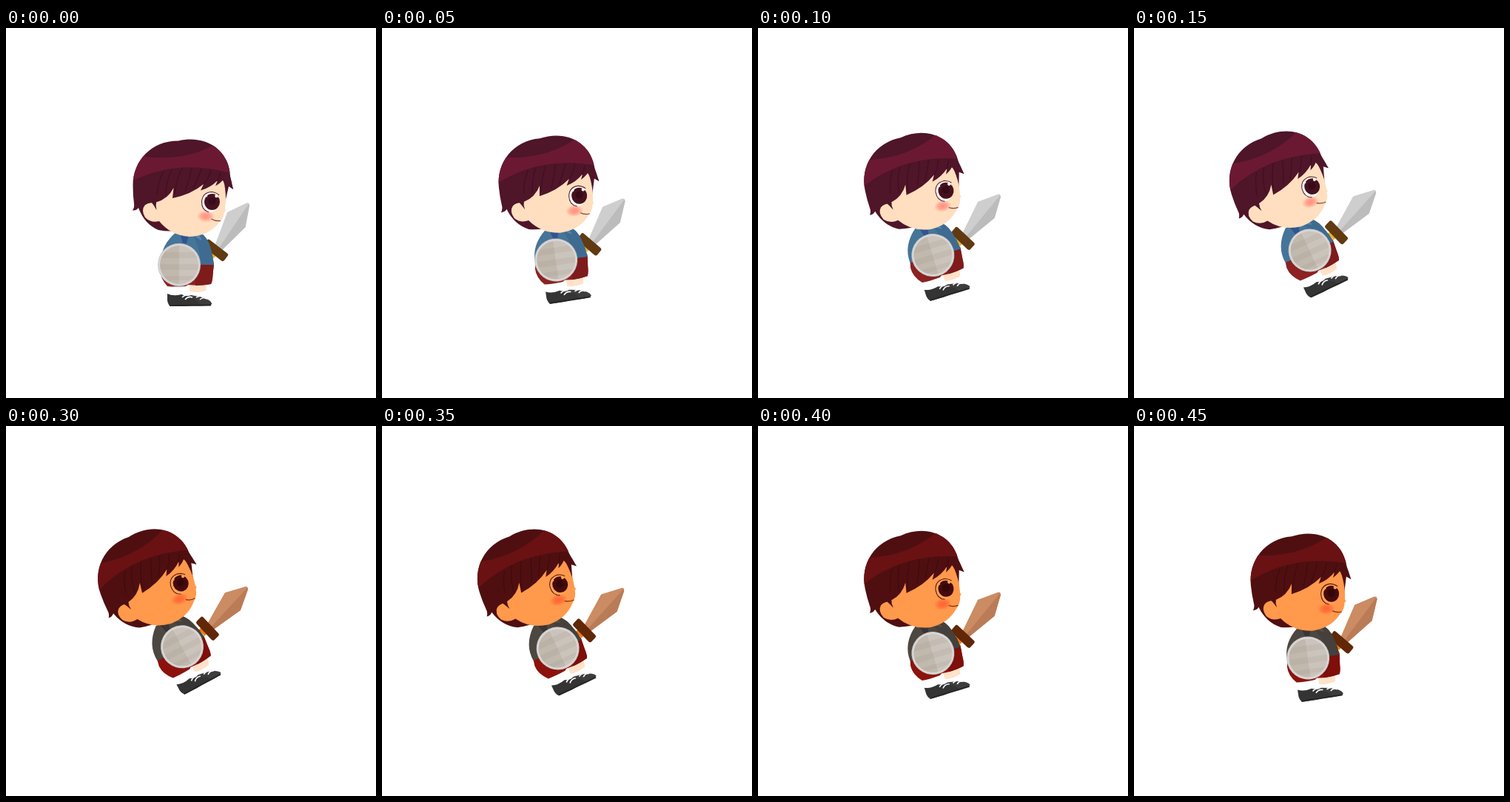
These frames come from a looping animation (500x500 px, 500 ms). An HTML page:

```html
<!DOCTYPE html>
<html lang="en">
<head>
<meta charset="utf-8">
<title>Little knight</title>
<style>
  html, body { margin: 0; width: 100%; height: 100%; overflow: hidden; background: #fff; }
  svg {
    display: block; width: 100vw; height: 100vh;
    --skin: #ffdfbf; --hair: #4f1529; --band: #6b1932; --strand: #41101f;
    --white: #fff; --iris: #46111f; --pupil: #370b19; --line: #58222d; --lip: #80463a;
    --blush: #ff8073; --blade: #cecece; --edge: #bcbcbc; --guard: #613a12; --gold: #f2b31f;
    --shirt: #457599; --shade: #3f6b91; --fold: #5488aa; --collar: #33548f;
    --shorts: #8c2222; --leg: #7e1b1b;
  }
  svg.hurt {
    --skin: #ff994c; --hair: #4f0f10; --band: #6a1114; --strand: #410b0c;
    --white: #ffa35a; --iris: #450a0b; --pupil: #350607; --line: #58170f; --lip: #802f15;
    --blush: #ff5a2e; --blade: #cb8b63; --edge: #ba7b57; --guard: #612707; --gold: #f2780c;
    --shirt: #4d4741; --shade: #45403b; --fold: #5a524a; --collar: #3b3437;
    --shorts: #8c130d; --leg: #7e0f0a;
  }
</style>
</head>
<body>
<svg viewBox="0 0 500 500">
  <defs>
    <radialGradient id="blush">
      <stop offset="0" stop-color="var(--blush)" stop-opacity=".85"/>
      <stop offset=".5" stop-color="var(--blush)" stop-opacity=".6"/>
      <stop offset="1" stop-color="var(--blush)" stop-opacity="0"/>
    </radialGradient>
    <clipPath id="hairClip"><use href="#hairShape"/></clipPath>
    <clipPath id="disc"><circle cx="234" cy="320" r="26"/></clipPath>
  </defs>

  <g id="sword">
    <path d="M278 296L287 303L281 311L272 304Z" fill="var(--gold)"/>
    <path d="M281 297L299 249L325 236.500Q329 235.500 329 240L323.500 269L291 301Z" fill="var(--blade)"/>
    <path d="M286 300L328 237.500L329 240L323.500 269L291 301Z" fill="var(--edge)"/>
    <path d="M275 286L299 304.500Q301 306 299.500 308L295 314Q293.500 316 291 314.500L268 296.500Q266 295 267.500 293L272 286.500Q273 285 275 286Z" fill="var(--guard)"/>
  </g>

  <g id="body">
    <path d="M246 345L272 344L270 355Q258 359 246 355Z" fill="#ffe2c9"/>
    <path d="M218 348L248 348L248 362L219 362Z" fill="#fff"/>
    <path d="M240 361Q244 363 250 361L262 363Q277 367 278.500 373Q276 375.500 262 375.500L240 375Z" fill="#3d3d3d"/>
    <path d="M218 359Q226 363 237 360L248 364Q260 367 262 374L241 376L223 376Q219 375 218 368Z" fill="#343434"/>
    <path d="M221 375L277 374.500" stroke="#262626" stroke-width="2"/>
    <path d="M238 364Q242 360 248 361M242 367Q246 362 252 364M257 364Q262 361 267 363M262 367Q266 363 271 366" fill="none" stroke="#fff" stroke-width="1.600"/>
    <path d="M210.500 317H281L279.500 333Q279 343 277 346Q262 349 246 347L243 349Q228 350 218 349Q208 338 208.500 326Z" fill="var(--shorts)"/>
    <path d="M256 319H281L279.500 333Q279 343 277 346Q266 348 256 348Z" fill="var(--leg)"/>
    <path d="M230 276H262Q272 282 276 296Q280 308 281 320L210 318.500Q208 294 230 276Z" fill="var(--shirt)"/>
    <path d="M250 277H262Q272 282 276 296Q280 308 281 320H263Q263 295 250 277Z" fill="var(--shade)"/>
    <path d="M250 276L259 276L265 287Q258 285 250 276Z" fill="var(--fold)"/>
    <path d="M235 277H248L244 291H239Z" fill="var(--collar)"/>
  </g>

  <g id="head">
    <path id="hairShape" d="M171.500 213C171.500 178 198 152 233 152.500C270 144 302 165 303 201Q304 210 307 218L301 214L295 240L240 273Q222 276 206 273Q187 265 179 243Q176 247 171 246.500Q174 242 173 237Q171.500 226 171.500 213Z" fill="var(--hair)"/>
    <path d="M160 172Q183 173 183 173Q240 182 285 156L320 160V200L310 198Q236 175 172 206L160 210Z" fill="var(--band)" clip-path="url(#hairClip)"/>
    <path d="M202 216Q240 196 290 202Q295 206 296 217Q298 232 296 244L297 247L295 249Q294 258 287 264Q273 281 248 282Q222 280 207 261Q196 264 188 256Q182 246 188 239Q195 234 203 238Z" fill="var(--skin)"/>
    <path d="M188 239Q193 235 197 236Q200 240 203.500 246Q202 240 203 235.500Q219 231 226.500 216L225 230Q250 225 267 211L263 219.500Q276 216 286 206L283 213.500Q291 209 295 203Q298 211 307 218Q305 207 302 197Q240 178 180 206L183 241Z" fill="var(--hair)"/>
    <path d="M213 194Q206 206 204 224M224 191Q216 207 216 226M238 189Q229 208 228 225M251 189Q248 205 242 221M264 190Q260 203 253 217M277 192Q274 202 268 211M290 195Q289 201 285 207" fill="none" stroke="var(--strand)" stroke-width="1.300"/>
    <ellipse cx="275.500" cy="235.500" rx="11.500" ry="13.500" fill="var(--white)"/>
    <path d="M274 249Q264 246 264.500 234Q266 222 278 221.500Q284 222 288 226" fill="none" stroke="var(--line)" stroke-width="1.100"/>
    <ellipse cx="278.500" cy="235" rx="10.500" ry="11" fill="var(--iris)"/>
    <circle cx="278.500" cy="234" r="5" fill="var(--pupil)"/>
    <circle cx="284.500" cy="227" r="2.200" fill="var(--white)"/>
    <circle cx="271" cy="227" r="1.200" fill="var(--white)"/>
    <ellipse cx="270" cy="254.500" rx="12" ry="8" fill="url(#blush)"/>
    <path d="M277.500 258Q283 261.500 290 260.500" fill="none" stroke="var(--lip)" stroke-width="1.200"/>
  </g>

  <g id="shield">
    <circle cx="234" cy="320" r="29" fill="#c9c7c6"/>
    <circle cx="234" cy="320" r="28" fill="#d9d7d6"/>
    <g clip-path="url(#disc)">
      <path d="M208 294H234V346H208Z" fill="#c1b8ae"/>
      <path d="M234 294H260V346H234Z" fill="#cbc4bc"/>
      <path d="M208 303H260V311H208ZM208 319H260V327H208ZM208 335H260V341H208Z" fill="#a39585" fill-opacity=".18"/>
    </g>
  </g>
</svg>
<script>
  const STEP = 50, COUNT = 10;
  // pivot, drift and turn for one unit of lean
  const parts = {
    sword:  { x: 284, y: 300,   dx: -3.3, dy: -8,   turn: 2.7 },
    body:   { x: 248, y: 347.5, dx: 1.1,  dy: -6.7, turn: -8.3 },
    head:   { x: 192, y: 347,   dx: 0,    dy: 0,    turn: -5.85 },
    shield: { x: 234, y: 320,   dx: 1.2,  dy: -6.5, turn: -8.3 }
  };
  const stage = document.querySelector('svg');

  // steady lean back, then a nearly held peak
  const leanAt = k => {
    const n = 5 - Math.abs(5 - k);
    return n <= 3 ? n : 3.33 + (n - 4) * 0.06;
  };

  function draw(ms) {
    const k = Math.floor(ms / STEP) % COUNT;
    const lean = leanAt(k);
    for (const [id, p] of Object.entries(parts)) {
      document.getElementById(id).setAttribute('transform',
        `translate(${p.dx * lean} ${p.dy * lean}) rotate(${p.turn * lean} ${p.x} ${p.y})`);
    }
    stage.classList.toggle('hurt', k >= 4);
  }

  const start = performance.now();
  function tick() {
    draw(performance.now() - start);
    requestAnimationFrame(tick);
  }
  tick();
</script>
</body>
</html>
```
